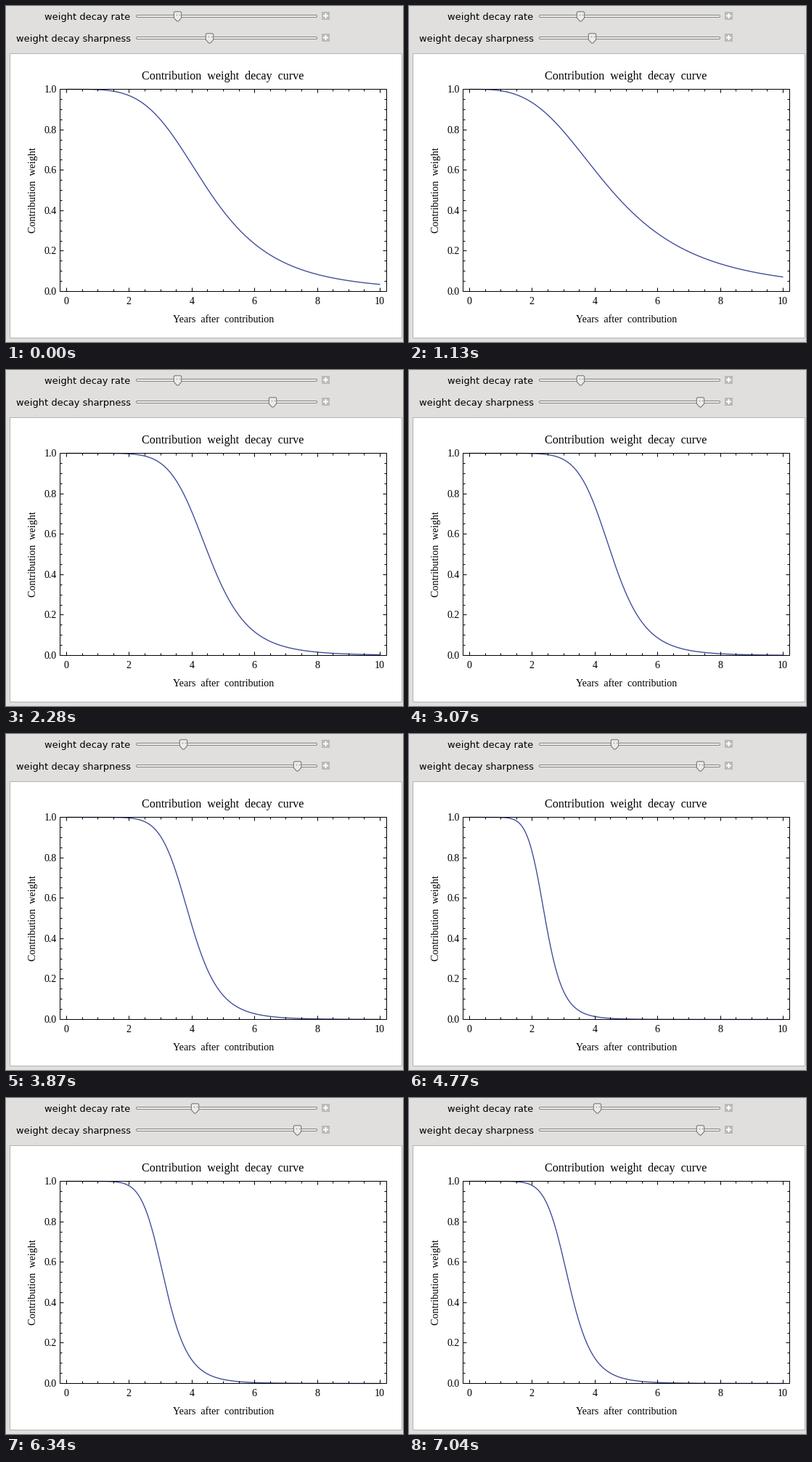
A matplotlib script that plays this animation: 547x462 px, repeating every 7140 ms.

```python
import numpy as np
import matplotlib.pyplot as plt
from matplotlib.animation import FuncAnimation
from matplotlib.collections import LineCollection
from matplotlib.patches import FancyBboxPatch, Polygon, Rectangle

plt.rcParams["path.snap"] = False

W, H = 547, 462
DPI = 64
PT = 72 / DPI          # points per pixel
LOOP, STEP = 7140, 51

LEFT, RIGHT, TOP, BOTTOM = 74.5, 524.5, 114.5, 392.5
X0, UNIT = 83.5, 43.2  # year zero and one year in pixels
RATE_Y, SHARP_Y = 14, 44
SERIF, SANS = "Liberation Serif", "DejaVu Sans"
INK, BLUE = "#000000", "#3f4a99"

# Turning points of the two drags: (ms, value)
SHARP_KEYS = [(660, 4.19), (1370, 2.8), (1540, 2.33), (1630, 2.33),
              (1750, 3.4), (1790, 3.4), (2360, 7.9), (2740, 8.35)]
RATE_KEYS = [(3550, 0.221), (3850, 0.2545), (3920, 0.2545), (4590, 0.388),
             (4680, 0.388), (4850, 0.44), (4970, 0.44), (5660, 0.128),
             (5990, 0.128), (6430, 0.362), (6740, 0.27), (6850, 0.316)]


def value_at(keys, ms):
    return np.interp(ms, *zip(*keys))


def sharp_knob(sharp):
    return round(280 + (sharp - 4.19) / 0.0343)


def rate_knob(rate):
    return round(182.3 + rate / 0.00413)


def px(years):
    return X0 + UNIT * years


def py(weight):
    return BOTTOM + (TOP - BOTTOM) * weight


fig = plt.figure(figsize=(W / DPI, H / DPI), dpi=DPI, facecolor="#e0dfdd")
ax = fig.add_axes([0, 0, 1, 1])
ax.set_xlim(0, W)
ax.set_ylim(H, 0)
ax.axis("off")


def label(x, y, s, size, font=SERIF, **kw):
    ax.text(x, y, s, fontsize=size * PT, family=font, color=INK,
            va="baseline", zorder=6, **kw)


def box(x, y, w, h, z, fc="none", ec="none"):
    ax.add_patch(Rectangle((x, y), w, h, fc=fc, ec=ec, zorder=z,
                           lw=0 if ec == "none" else PT))


def knob_shape(x, y):
    half = np.array([(1, 7), (5.2, 2.3), (5.2, -5), (4, -6.2)])
    outline = np.vstack([half, half[::-1] * (-1, 1)])
    return outline + (x + 0.5, y)


def add_slider(y, name):
    label(171.5, y + 5, name, 13, SANS, ha="right")
    ax.add_patch(FancyBboxPatch(
        (179.5, y - 1.5), 249, 3, boxstyle="round,pad=0,rounding_size=1.4",
        fc="#eeeeed", ec="#858585", lw=PT, zorder=2))
    box(435, y - 6, 11, 11, 2, "#b9b9b7")
    box(437, y - 1.5, 7, 2, 3, "white")
    box(439.5, y - 4, 2, 7, 3, "white")
    knob = Polygon(knob_shape(200, y), fc="#ebebea", ec="#707070",
                   lw=PT, joinstyle="round", zorder=4)
    ax.add_patch(knob)
    grip, = ax.plot([], [], "s", ms=1.3 * PT, color="#8c8c8c", mew=0, zorder=5)
    return knob, grip


def move_slider(slider, x, y):
    knob, grip = slider
    knob.set_xy(knob_shape(x, y))
    grip.set_data([x - 1.5, x + 2.5], [y - 2.5] * 2)


def add_plot_frame():
    box(5.5, 65.5, 540, 391, 1, "white", "#b4b4b4")
    box(LEFT, TOP, RIGHT - LEFT, BOTTOM - TOP, 4, ec=INK)
    ticks = []
    for i in range(21):
        x = np.floor(px(i / 2)) + 0.5
        y = np.floor(py(i / 20)) + 0.5
        n = 5 if i % 4 == 0 else 3
        ticks += [[(x, BOTTOM), (x, BOTTOM - n)], [(x, TOP), (x, TOP + n)],
                  [(LEFT, y), (LEFT + n, y)], [(RIGHT, y), (RIGHT - n, y)]]
        if i % 4 == 0:
            label(x - 0.5, 410, str(i // 2), 14, ha="center")
            label(70, y + 4.5, f"{i / 20:.1f}", 14, ha="right")
    ax.add_collection(LineCollection(ticks, colors=INK, linewidths=PT, zorder=4))


def spaced(s):
    return s.replace(" ", "  ")


add_plot_frame()
label(187, 101, spaced("Contribution weight decay curve"), 16.1)
label(230, 435, spaced("Years after contribution"), 14)
label(40.5, 312, spaced("Contribution weight"), 14.1,
      rotation=90, rotation_mode="anchor")
rate_slider = add_slider(RATE_Y, "weight decay rate")
sharp_slider = add_slider(SHARP_Y, "weight decay sharpness")

years = np.linspace(0, 10, 301)
curve, = ax.plot([], [], color=BLUE, lw=1.35 * PT, zorder=3,
                 solid_capstyle="butt")


def update(i):
    ms = (i + 0.5) * STEP
    rate, sharp = value_at(RATE_KEYS, ms), value_at(SHARP_KEYS, ms)
    move_slider(rate_slider, rate_knob(rate), RATE_Y)
    move_slider(sharp_slider, sharp_knob(sharp), SHARP_Y)
    curve.set_data(px(years), py(1 / (1 + (years * rate) ** sharp)))
    return [curve, *rate_slider, *sharp_slider]


anim = FuncAnimation(fig, update, frames=LOOP // STEP, interval=STEP,
                     init_func=lambda: update(0), repeat=True, repeat_delay=0)
plt.show()
```
